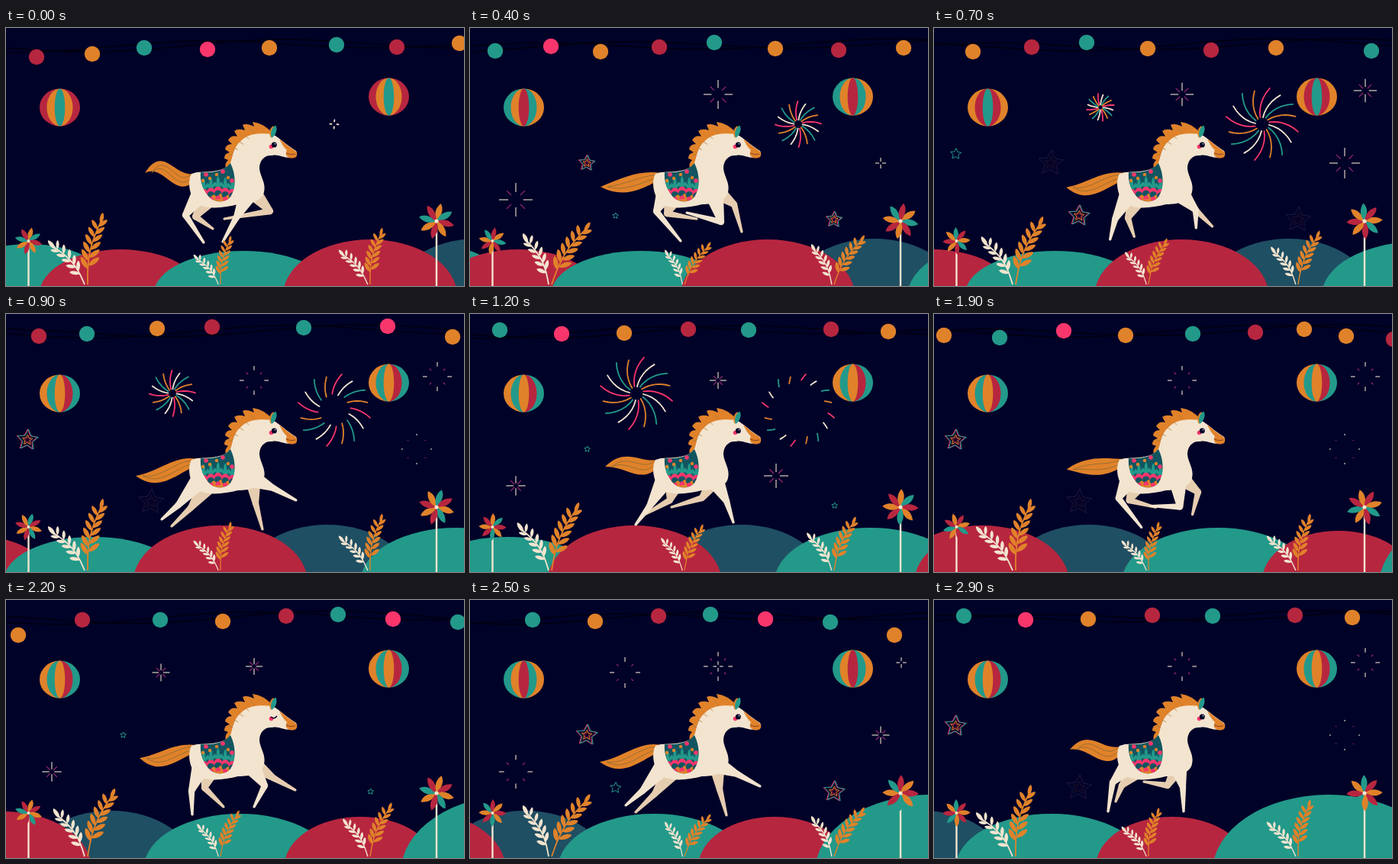
Animation, 600 px wide and 338 px high, one loop 3 s. Source, as an HTML page with a canvas:

```html
<!DOCTYPE html>
<html lang="en">
<head>
<meta charset="utf-8">
<title>Festival horse</title>
<style>
html, body { margin: 0; width: 100%; height: 100%; overflow: hidden; background: #010228; }
canvas { display: block; }
</style>
</head>
<body>
<canvas id="stage" width="600" height="338"></canvas>
<script>
const g = document.getElementById('stage').getContext('2d');
const C = {
  r: '#b7263f', o: '#e0822a', t: '#23998a', p: '#f9366c', b: '#1f4f63',
  cream: '#f3e4cf', tan: '#e6cdb0', navy: '#010228', deep: '#125561', purple: '#a52c78'
};
const TAU = Math.PI * 2, STEP = 100, STEPS = 30;
const lerp = (a, b, k) => a + (b - a) * k;

function fill(color, build) {
  g.beginPath(); build(g); g.fillStyle = color; g.fill();
}
function line(color, width, build) {
  g.beginPath(); build(g); g.strokeStyle = color; g.lineWidth = width; g.stroke();
}
const dot = (color, x, y, rx, ry = rx) => fill(color, c => c.ellipse(x, y, rx, ry, 0, 0, TAU));
const shape = (color, d) => { g.fillStyle = color; g.fill(new Path2D(d)); };
const curve = (color, width, d) => { g.strokeStyle = color; g.lineWidth = width; g.stroke(new Path2D(d)); };
function at(x, y, angle, draw) {
  g.save(); g.translate(x, y); g.rotate(angle); draw(); g.restore();
}
function leaf(color, x, y, angle, length, width) {
  at(x, y, angle, () => fill(color, c => {
    c.moveTo(0, 0);
    c.bezierCurveTo(-width, -length * .35, -width * .7, -length * .85, 0, -length);
    c.bezierCurveTo(width * .7, -length * .85, width, -length * .35, 0, 0);
  }));
}

// Hills: colour, centre, half width, top; the blue one lies behind the rest.
const hills = [
  ['b', 617, 108, 276], ['t', 30, 112, 283], ['r', 150, 104, 290], ['t', 311, 115, 292],
  ['r', 477, 112, 277], ['t', 786, 123, 280], ['r', 944, 98, 284], ['t', 1149, 149, 255]
];
function drawHills(s) {
  for (const [color, x, half, top] of hills) {
    const ry = (338 - top) * 1.22;
    dot(C[color], x - 21.8 * s, top + ry, half * 1.02, ry);
  }
}

// Garland: first step, colours, then x and y of each bulb.
const garland = [
  [0, 'rotpotro', [40, 38, 113, 34, 181, 26, 264, 28, 345, 26, 433, 22, 512, 25, 594, 20]],
  [4, 'tportoro', [33, 30, 106, 24, 171, 31, 248, 25, 320, 19, 400, 27, 483, 29, 568, 26]],
  [9, 'rtortpo', [43, 29, 106, 26, 198, 19, 270, 17, 390, 18, 500, 16, 585, 30]],
  [12, 'tportro', [39, 21, 120, 26, 202, 25, 286, 20, 365, 21, 473, 20, 548, 23]],
  [16, 'orotpotro', [0, 29, 62, 33, 133, 28, 206, 31, 290, 22, 371, 28, 459, 26, 541, 24, 605, 20]],
  [22, 'ortortpt', [16, 46, 100, 26, 202, 26, 284, 28, 367, 21, 435, 19, 507, 25, 592, 29]]
];
garland.push([29, ...garland[3].slice(1)]);
function drawGarland(s) {
  const [start, colors, pts] = garland.filter(k => k[0] <= s).pop();
  const drift = (s - start) * 40;
  for (const phase of [0, 1.4]) {
    line('#000010', 1.6, c => {
      for (let x = 0; x <= 600; x += 10)
        c.lineTo(x, 23 + 6 * Math.sin((x + s * 40) / 75 + phase) + 3 * Math.cos(x / 160));
    });
  }
  [...colors].forEach((color, i) => {
    const x = (pts[2 * i] - drift + 1360) % 660 - 40;
    dot(C[color], x, pts[2 * i + 1], 10.2);
  });
}

const stripes = ['rotor', 'otort', 'torto', 'ortro', 'otort'];
function drawLantern(x, y, s) {
  const c = stripes[Math.floor(s % 10 / 2)];
  const half = (color, rx, side) =>
    fill(C[color], p => p.ellipse(x, y, rx, 24.5, 0, -Math.PI / 2, Math.PI / 2, side < 0));
  [[0, 26.5, -1], [4, 26.5, 1], [1, 17, -1], [3, 17, 1]].forEach(([i, rx, side]) => half(c[i], rx, side));
  dot(C[c[2]], x, y, 6.8, 24.5);
}

function drawFirework(x, y, age) {
  if (age < 1 || age > 14) return;
  const outer = Math.min(48, 6 * age);
  const inner = age < 8 ? age * 1.2 + (age < 2 ? 2.5 : 0) : 9.6 + (age - 8) * 6;
  const colors = [C.cream, C.t, C.o, C.p];
  g.lineCap = 'round';
  for (let i = 0; i < 16; i++) {
    if (age < 2 && i % 4) continue;
    const reach = i % 2 ? 1 : .93, from = inner * reach, to = outer * reach;
    line(colors[i % 4], 1.8, c => {
      for (let k = 0; k <= 6; k++) {
        const r = lerp(from, to, k / 6), a = i / 16 * TAU + r / 80;
        c.lineTo(x + r * Math.cos(a), y + r * Math.sin(a));
      }
    });
  }
  g.lineCap = 'butt';
}

function drawSparkle(x, y, size, age) {
  if (age < 0 || age > 5) return;
  const outer = Math.min(20, 7 + 4.5 * age) * size;
  const inner = [2, 3, 5, 9, 14, 18][age] * size;
  for (let i = 0; i < 8; i++) {
    const diagonal = i % 2, a = i * TAU / 8, k = diagonal ? .85 : 1;
    if (diagonal && age < 1) continue;
    const from = inner * k, to = diagonal ? Math.max(from + 1.5, outer * k * .9) : outer;
    line(diagonal ? C.purple : C.cream, 1.1, c => {
      c.moveTo(x + from * Math.cos(a), y + from * Math.sin(a));
      c.lineTo(x + to * Math.cos(a), y + to * Math.sin(a));
    });
  }
}

function drawStar(x, y, age) {
  if (age < 1 || age > 6) return;
  const size = Math.min(17, 4 + 3.4 * (age - 1));
  const outline = (color, r, dx, width) => line(color, width, c => {
    for (let i = 0; i < 10; i++) {
      const q = i % 2 ? r * .48 : r, a = i * TAU / 10 - 1.5;
      c.lineTo(x + dx + q * Math.cos(a), y + q * Math.sin(a));
    }
    c.closePath();
  });
  g.globalAlpha = age > 5 ? .12 : 1;
  if (size > 8) {
    outline(C.p, size, -.6, 1);
    outline(C.o, size * .5, 0, 1);
    outline(C.r, size * .3, 0, .8);
  }
  outline(C.t, size, .6, 1);
  g.globalAlpha = 1;
}

const sparkles = [[60, 225, 1.1, 1], [325, 87, .95, 1], [325, 87, .95, 5], [565, 82, .95, 5], [538, 177, 1, 4]];
const stars = [[153, 177, 1], [477, 251, 1], [190, 246, 3], [28, 165, 5]];
function drawSky(s) {
  const age = start => s < start ? -1 : (s - start) % 10;
  sparkles.forEach(([x, y, size, start]) => drawSparkle(x, y, size, age(start)));
  drawSparkle(401, 212, 1, s - 10);
  drawSparkle(203, 95, 1, s - 21);
  stars.forEach(([x, y, start]) => drawStar(x, y, age(start)));
  drawFirework(430, 126, s + 1);
  drawFirework(218, 104, s - 4);
}

function sprig(color, x, angle, length, pairs, scale) {
  at(x, 336, angle, () => {
    g.scale(scale, scale);
    const bend = v => Math.sin(v * Math.PI) * (angle < 0 ? 6 : -6);
    line(color, 1.8, c => {
      for (let v = 0; v <= 1.01; v += .1) c.lineTo(bend(v), -v * (length - 10));
    });
    for (let i = 0; i < pairs; i++) {
      const v = .26 + .62 * i / (pairs - 1), size = length * .19 - i * .6;
      for (const side of [-1, 1])
        leaf(color, bend(v), -v * (length - 10) - side * 2, side * .72, size, size * .27);
    }
    leaf(color, 0, -length + 14, 0, 15, 4);
  });
}
function drawPlant(x, scale, s) {
  const sway = -Math.cos((s + .5) * TAU / 10);
  sprig(C.cream, x - 4 * scale, -.58 + .12 * sway, 74, 5, scale);
  sprig(C.o, x, .38 + .18 * sway, 95, 6, scale);
}

function drawPinwheel(x, y, size, s) {
  line(C.cream, 2.4, c => { c.moveTo(x, y); c.lineTo(x, 338); });
  for (let i = 0; i < 8; i++)
    at(x, y, i * TAU / 8 + .12 + s * .18, () => shape(C['otrorotr'[i]],
      `M0 0Q${-size * .3} ${-size * .55} ${size * .12} ${-size}Q${size * .42} ${-size * .6} 0 0`));
  dot(C.cream, x, y, size * .11);
}

// Gallop poses: knee x, y and hoof x, y at each key step of a 16 step stride.
const strideSteps = [0, 4, 6, 9, 12, 13, 16];
const frontNear = [[302, 248, 284, 280], [329, 254, 284, 242], [339, 243, 325, 271],
  [350, 228, 380, 244], [336, 245, 345, 273], [326, 245, 327, 277]];
const frontFar = [[346, 240, 286, 250], [346, 231, 356, 267], [350, 233, 379, 249],
  [327, 248, 336, 282], [304, 241, 264, 253], [306, 243, 275, 238]];
const hindNear = [[235, 245, 259, 281], [244, 240, 276, 279], [243, 250, 244, 281],
  [226, 250, 204, 269], [235, 252, 217, 276], [234, 239, 228, 277]];
const hindFar = [[248, 247, 271, 263], [258, 243, 297, 250], [260, 246, 285, 271],
  [242, 254, 217, 278], [262, 244, 230, 262], [246, 243, 238, 264]];
// Tail: two control points of the upper edge, then the tip.
const tail = [[222, 200, 207, 150, 182, 190], [222, 186, 200, 196, 171, 208], [220, 186, 200, 203, 175, 207],
  [222, 184, 200, 207, 170, 212], [225, 198, 205, 172, 177, 200], [222, 203, 205, 164, 178, 196]];

function pose(keys, s) {
  const t = s % 16;
  let i = 0;
  while (strideSteps[i + 1] <= t) i++;
  const k = (t - strideSteps[i]) / (strideSteps[i + 1] - strideSteps[i]);
  const next = keys[(i + 1) % keys.length];
  return keys[i].map((v, n) => lerp(v, next[n], k));
}
function taper(color, x1, y1, r1, x2, y2, r2) {
  const a = Math.atan2(y2 - y1, x2 - x1) + Math.PI / 2, cx = Math.cos(a), cy = Math.sin(a);
  fill(color, c => {
    c.moveTo(x1 + r1 * cx, y1 + r1 * cy);
    c.lineTo(x2 + r2 * cx, y2 + r2 * cy);
    c.lineTo(x2 - r2 * cx, y2 - r2 * cy);
    c.lineTo(x1 - r1 * cx, y1 - r1 * cy);
  });
  dot(color, x2, y2, r2);
}
function leg(color, x, y, r, keys, s) {
  const [kx, ky, hx, hy] = pose(keys, s);
  taper(color, x, y, r, kx, ky, 4.2);
  taper(color, kx, ky, 4.2, hx, hy, 1.6);
}

function drawTail(s) {
  const [ax, ay, bx, by, tx, ty] = pose(tail, s);
  shape(C.o, `M250 190C${ax} ${ay} ${bx} ${by} ${tx} ${ty}C${bx} ${by + 27} ${ax} ${ay + 27} 248 199Z`);
  for (const d of [9, 18])
    curve('#8a6a35', .8, `M242 ${188 + d / 2}C${ax} ${ay + d} ${bx + 3} ${by + d} ${tx + 9} ${ty}`);
}

function drawSaddle() {
  const cloth = new Path2D('M255 189C270 190 285 188 294 177C301 191 302 209 294 221C288 229 273 230 265 220C257 210 254 200 255 189Z');
  g.save();
  g.fillStyle = C.deep; g.fill(cloth); g.clip(cloth);
  for (let i = 0; i < 5; i++) {
    const x = 259 + i * 9.4, y = 211 - Math.abs(i - 2) * -1.5;
    for (const turn of [-.65, 0, .65]) leaf(C.t, x, y - 2, turn, turn ? 9 : 15, 3.2);
    dot(C.p, x, y + 2, 5.2);
    dot(C.deep, x, y + 6, 4.6);
    dot(C.o, x + 4.6, y + 10, 4);
    dot(C.p, x, y + 12, 3.4);
  }
  [[262, 192], [284, 188], [296, 200]].forEach(([x, y]) => dot(C.p, x, y, 2.8));
  [[267, 197], [291, 196], [258, 200], [276, 192]].forEach(([x, y]) => dot(C.o, x, y, 2.2));
  dot(C.o, 280, 228, 7, 4);
  g.restore();
}

function drawHorse(s) {
  drawTail(s);
  leg(C.tan, 268, 219, 14, hindFar, s);
  leg(C.tan, 323, 214, 11, frontFar, s);
  leg(C.cream, 257, 214, 13, hindNear, s);
  leg(C.cream, 319, 214, 13, frontNear, s);
  shape(C.cream, `M250 189C262 188 280 189 291 181C297 170 297 158 306 147C316 134 334 131 347 138
    C357 142 364 151 380 161C383 166 379 171 372 170C362 170 356 165 349 167C338 166 332 174 332 184
    C333 195 341 203 338 215C335 227 320 231 304 231C288 235 268 238 254 232C240 224 237 201 243 191Z`);
  shape(C.o, `M350 139Q339 125 323 123L325 129Q315 124 310 127L313 134Q304 131 299 135L303 142
    Q295 140 291 147L296 152Q288 152 287 159L293 163Q286 164 286 171L291 173Q286 177 288 184
    Q294 180 296 170C298 159 303 150 314 143C325 137 338 138 350 139Z`);
  for (let i = 0; i < 5; i++)
    curve('#a97832', .7, `M${291 + i * 7.5} ${165 - i * 8}l${6 - i * .4} ${2 + i * .8}`);
  shape(C.o, 'M358 145Q363 156 368 160Q365 165 369 169Q375 172 380 169Q383 164 379 161Q368 154 358 145Z');
  curve('#7d3b22', .9, 'M367 164Q373 167 379 165');
  leaf(C.o, 347, 144, .2, 16, 5);
  leaf(C.t, 348, 144, .32, 17, 5);
  dot(C.p, 347.5, 155.5, 2.8);
  if (s >= 21 && s <= 23) curve(C.navy, 1.5, 'M347 153Q351 157 355 152');
  else {
    dot(C.navy, 351.3, 153, 3.5);
    dot('#fff', 352.5, 151.8, .8);
  }
  drawSaddle();
}

function frame() {
  const s = Math.floor(performance.now() / STEP) % STEPS;
  g.fillStyle = C.navy;
  g.fillRect(0, 0, 600, 338);
  drawGarland(s);
  drawLantern(70.5, 104, s);
  drawLantern(501.5, 90, s);
  drawSky(s);
  drawHills(s);
  drawHorse(s);
  drawPlant(107, 1, s);
  drawPlant(281, .68, s);
  drawPlant(477, .79, s);
  drawPinwheel(29.5, 279, 18, s);
  drawPinwheel(564, 253, 23.5, s);
  requestAnimationFrame(frame);
}
requestAnimationFrame(frame);
</script>
</body>
</html>
```
